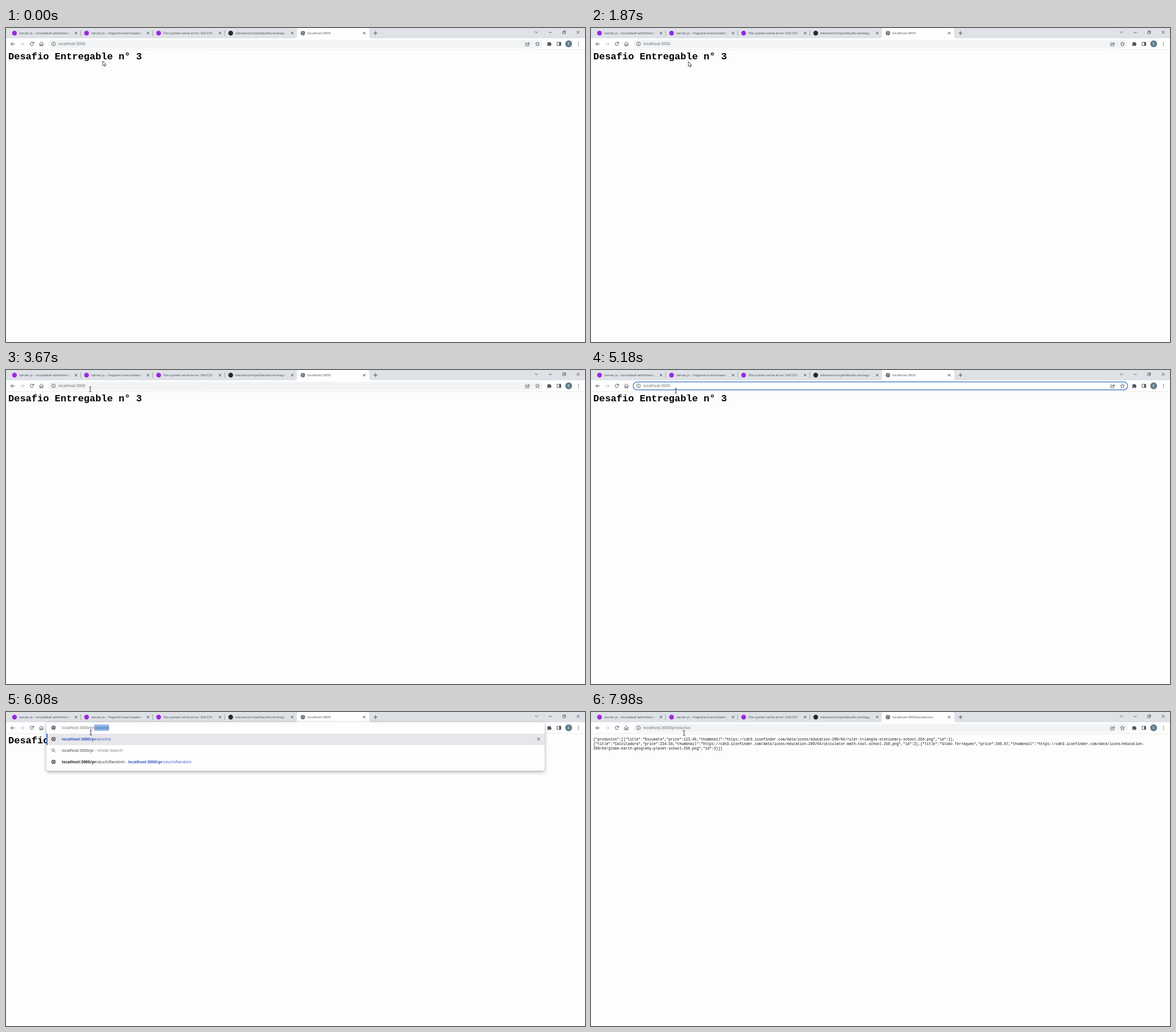
Animation of 1017x551 px, one loop 8000 ms. Source, as an HTML page:

```html
<!DOCTYPE html>
<html lang="es">
<head>
<meta charset="utf-8">
<title>localhost:3000</title>
<style>
html, body { margin: 0; width: 100%; height: 100%; overflow: hidden; background: #fdfdfd; }
#stage { position: absolute; inset: 0; overflow: hidden; font: 7px "Open Sans", "Noto Sans", sans-serif; color: #333; }
svg { position: absolute; left: 0; top: 0; width: 1017px; height: 551px; }
svg text { white-space: pre; }
.tab { font-size: 6px; fill: #454a50; }
.url { font-size: 7px; fill: #60656a; }
.line { fill: none; stroke: #4d5156; stroke-width: 1; }
h1, pre { position: absolute; margin: 0; left: 4px; white-space: pre; color: #000; }
h1 { top: 41px; font: bold 17px/20px "Liberation Mono", monospace; }
pre { top: 44.5px; font: 6.31px/8.2px "Liberation Mono", monospace; color: #111; }

.pane { position: absolute; left: 71px; top: 18px; width: 875px; padding-bottom: 4.5px; background: #fefefe;
  border-radius: 4px; box-shadow: 0 2px 6px rgba(60,64,67,.45); overflow: visible; white-space: pre; }
.row { position: relative; height: 20px; line-height: 19.4px; padding-left: 27px; box-sizing: border-box; }
.row svg { left: 8px; top: 5px; width: 9px; height: 9px; overflow: visible; }
.row.hit { background: #e7e7eb; box-shadow: inset 2px 0 #3f73d8; color: #3457bd; }
.row .x { left: 860px; }
.row.input { color: #60656a; }
.sel { background: #92b9ec; color: #3d5878; padding: .8px 0; }
.link { color: #3457bd; }
.dim { color: #70757a; }
b { font-weight: bold; }
.row b { color: #222; }
.hit b, .row .link b { color: #3457bd; }

.before, .after, #ring, .pane, #arrow, #beam { animation: 8s step-end infinite; }
.before { animation-name: before; }
.after { animation-name: after; }
#ring { animation-name: ring; }
#typed { animation: typed 8s step-end infinite; }
#slash { animation-name: slash; }
#p { animation-name: p; }
#pr { animation-name: pr; }
#arrow { animation-name: arrow; }
#beam { animation-name: beam; }
#pointer { animation: move 8s ease-in-out infinite; }

@keyframes before { 0% { opacity: 1 } 82.5%, 100% { opacity: 0 } }
@keyframes after { 0% { opacity: 0 } 82.5%, 100% { opacity: 1 } }
@keyframes typed { 0% { opacity: 0 } 81.75%, 100% { opacity: 1 } }
@keyframes ring { 0% { opacity: 0 } 64.75% { opacity: 1 } 68.5%, 100% { opacity: 0 } }
@keyframes slash { 0% { opacity: 0 } 68.5% { opacity: 1 } 72.25%, 100% { opacity: 0 } }
@keyframes p { 0% { opacity: 0 } 72.25% { opacity: 1 } 75.125%, 100% { opacity: 0 } }
@keyframes pr { 0% { opacity: 0 } 75.125% { opacity: 1 } 81.75%, 100% { opacity: 0 } }
@keyframes arrow { 0% { opacity: 1 } 42.6%, 100% { opacity: 0 } }
@keyframes beam { 0% { opacity: 0 } 42.6%, 100% { opacity: 1 } }
@keyframes move {
  0% { transform: translate(170px, 58px) }
  11.75% { transform: translate(170.5px, 59px) }
  16.25% { transform: translate(172px, 64px) }
  20.9% { transform: translate(171px, 60px) }
  23.4%, 27.6% { transform: translate(171px, 59px) }
  30% { transform: translate(190px, 84px) }
  35.5% { transform: translate(395px, -2px) }
  38% { transform: translate(396px, 2px) }
  45.9%, 48.4% { transform: translate(148px, 34px) }
  50.1%, 58% { transform: translate(148.2px, 35.5px) }
  59.6%, 95.5% { transform: translate(149px, 36.3px) }
  99.75%, 100% { transform: translate(163.5px, 37px) }
}
</style>
</head>
<body>
<div id="stage">
  <h1 class="before">Desafio Entregable n° 3</h1>
  <pre class="after">{"productos":[{"title":"Escuadra","price":123.45,"thumbnail":"https://cdn3.iconfinder.com/data/icons/education-209/64/ruler-triangle-stationary-school-256.png","id":1},
{"title":"Calculadora","price":234.56,"thumbnail":"https://cdn3.iconfinder.com/data/icons/education-209/64/calculator-math-tool-school-256.png","id":2},{"title":"Globo Terráqueo","price":345.67,"thumbnail":"https://cdn3.iconfinder.com/data/icons/education-
209/64/globe-earth-geograhy-planet-school-256.png","id":3}]}</pre>

  <svg viewBox="0 0 1017 551">
    <defs>
      <linearGradient id="fade">
        <stop stop-color="#dee1e6" stop-opacity="0"/><stop offset=".75" stop-color="#dee1e6"/>
      </linearGradient>
      <symbol id="globe" viewBox="0 0 9 9">
        <circle cx="4.5" cy="4.5" r="3.8" fill="#50555a"/>
        <path d="M1.5 3.2L3.6 4.5 3.4 6 4.6 7.6M4.6 1.2L4.3 2.6 6 3.6 6.2 5.2 7.6 5.4" fill="none" stroke="#fff" stroke-width=".9"/>
      </symbol>
      <symbol id="lens" viewBox="0 0 9 9">
        <path d="M5.2 5.2L7.6 7.6M5.9 3.7A2.2 2.2 0 1 1 1.5 3.7 2.2 2.2 0 0 1 5.9 3.7Z" fill="none" stroke="#50555a" stroke-width=".9"/>
      </symbol>
      <symbol id="cross" viewBox="0 0 9 9">
        <path d="M2.2 2.2L6.8 6.8M6.8 2.2L2.2 6.8" fill="none" stroke="#3c4043"/>
      </symbol>
    </defs>
    <rect width="1017" height="18" fill="#dee1e6"/>
    <rect y="18" width="1017" height="19.5" fill="#fefefe"/>
    <path d="M0 37.8H1017" stroke="#e6e6e0" stroke-width=".8"/>
    <path d="M507 18Q511 18 511 14V4Q511 0 515 0H634Q638 0 638 4V14Q638 18 642 18Z" fill="#fefefe"/>
    <g id="tabs"></g>
    <use href="#globe" x="517" y="4.5" width="9" height="9"/>
    <text class="tab" x="529.7" y="11.2">localhost:3000<tspan class="after">/productos</tspan></text>
    <use href="#cross" x="625" y="4.8" width="8.4" height="8.4"/>

    <g class="line" stroke="#3c4043">
      <path d="M649 5.6V12.4M645.6 9H652.4"/>
      <path d="M929 6L931.7 8.7 934.4 6" stroke-width=".9"/>
      <path d="M953.5 7.8H958.5M1002.4 4.9L1007.6 10.1M1007.6 4.9L1002.4 10.1" stroke-width=".9"/>
      <path d="M977.8 6.2H981.6V10H977.8ZM979 6V5H982.8V8.8H981.8" stroke-width=".8"/>
      <path d="M15.4 28H8.6M11.7 24.8L8.5 28 11.7 31.2"/>
      <path d="M25 28H31.8M28.7 24.8L31.9 28 28.7 31.2" stroke="#bfc2c5"/>
      <path d="M48 26A3 3 0 1 0 48.4 28.8M48.6 24.4V26.9H46.1"/>
      <path d="M58.4 28L62.2 24.4 66 28M59.6 27.4V31.5H61.2V29H63.2V31.5H64.8V27.4" stroke-width=".9"/>
    </g>

    <rect x="74" y="20.8" width="869" height="14.4" rx="7.2" fill="#f1f3f4"/>
    <rect id="ring" x="74" y="20.8" width="868.6" height="14" rx="7" fill="#fefefe" stroke="#2f6fc4" stroke-width="1.2"/>
    <g class="line" stroke-width=".8">
      <circle cx="83.5" cy="27.8" r="3.3" stroke-width=".8"/>
      <path d="M83.5 27.3V29.8M83.5 25.7V26.5" stroke-width=".9"/>
      <path d="M914.6 25.8H912.8V31.3H918.6V29.6M914.5 29Q915 26.6 918 26.6V25L920 27.2 918 29.2V27.8Q915.6 27.8 914.5 29Z" stroke-width=".8"/>
      <path d="M933.5 24.2L934.5 26.7 937.2 26.9 935.1 28.6 935.8 31.2 933.5 29.8 931.2 31.2 931.9 28.6 929.8 26.9 932.5 26.7Z" stroke-width=".8"/>
      <rect x="968" y="25" width="6.4" height="5.8" stroke-width=".9"/>
    </g>
    <text class="url" x="92" y="30.3">localhost:3000<tspan id="extra"></tspan></text>
    <g fill="#4d5156">
      <path d="M950.8 25.6H953A1.1 1.1 0 0 1 955.2 25.6H957.2V27.4A1.1 1.1 0 0 1 957.2 29.6V31.6H955.1A1.1 1.1 0 0 0 952.9 31.6H950.8V29.6A1.1 1.1 0 0 0 950.8 27.5Z"/>
      <rect x="971.6" y="25" width="2.8" height="5.8"/>
      <circle cx="1005.5" cy="25.3" r=".8"/><circle cx="1005.5" cy="28" r=".8"/><circle cx="1005.5" cy="30.7" r=".8"/>
    </g>
    <circle cx="988.3" cy="27.8" r="6" fill="#5f7b89"/>
    <text x="988.3" y="30.2" font-size="6.4" fill="#fff" text-anchor="middle">E</text>
  </svg>

  <div id="panes"></div>

  <svg viewBox="0 0 1017 551">
    <g id="pointer">
      <path id="arrow" d="M0 0V8.4L1.9 6.7 3.2 9.6 4.6 9 3.3 6.2H5.8Z" fill="#fff" stroke="#222" stroke-width=".8"/>
      <path id="beam" d="M-2 -4H-.5L0 -3.6 .5 -4H2M0 -3.6V3.6M-2 4H-.5L0 3.6 .5 4H2" fill="none" stroke="#222" stroke-width=".9"/>
    </g>
  </svg>
</div>
<script>
const tabs = [
  ['server.js – broadleaf-admitted-n', '#9a2be0'],
  ['server.js – fragrant-marmalade-l', '#9a2be0'],
  ['File system write error: EACCES -', '#9a2be0'],
  ['eleuteriomirjal/desafio-entrega', '#24292e'],
];
document.getElementById('tabs').innerHTML = tabs.map(([title, color], i) => {
  const x = 23.3 + i * 126.6;
  const split = i < 3 ? `<path d="M${x + 107.7} 4V14" stroke="#8f9499" stroke-width=".8"/>` : '';
  return `<circle cx="${x - 8.4}" cy="9" r="4.2" fill="${color}"/>
    <text class="tab" x="${x}" y="11.2">${title}</text>
    <rect x="${x + 82}" y="2" width="13.5" height="14" fill="url(#fade)"/>
    <use href="#cross" x="${x + 95.4}" y="4.8" width="8.4" height="8.4"/>${split}`;
}).join('');

const extra = document.getElementById('extra');
extra.textContent = '/productos';
extra.id = 'typed';

const host = 'localhost:3000/';
const paths = ['productoRandom', 'productos/1', 'productos/2', 'productos/3', 'productos/4'];
const icon = (name, cls = '') => `<svg class="${cls}"><use href="#${name}" width="9" height="9"/></svg>`;
const row = (name, html, cls = '') => `<div class="row ${cls}">${icon(name)}${html}</div>`;

// Suggestion list for what has been typed after the host
function pane(id, typed, count) {
  const match = path => `<b>${host}${typed}</b>${path.slice(typed.length)}`;
  const rest = 'productos'.slice(typed.length);
  return `<div class="pane" id="${id}">` +
    row('globe', `${host}${typed}<span class="sel">${rest}</span>`, 'input') +
    row('globe', match('productos') + icon('cross', 'x'), 'hit') +
    row('lens', `${host}${typed}<span class="dim"> - Vindel Search</span>`) +
    paths.slice(0, count - 2).map(path =>
      row('globe', `${match(path)}<span class="dim"> - </span><span class="link">${match(path)}</span>`)).join('') +
    '</div>';
}
document.getElementById('panes').innerHTML =
  pane('slash', '', 7) + pane('p', 'p', 4) + pane('pr', 'pr', 3);
</script>
</body>
</html>
```
